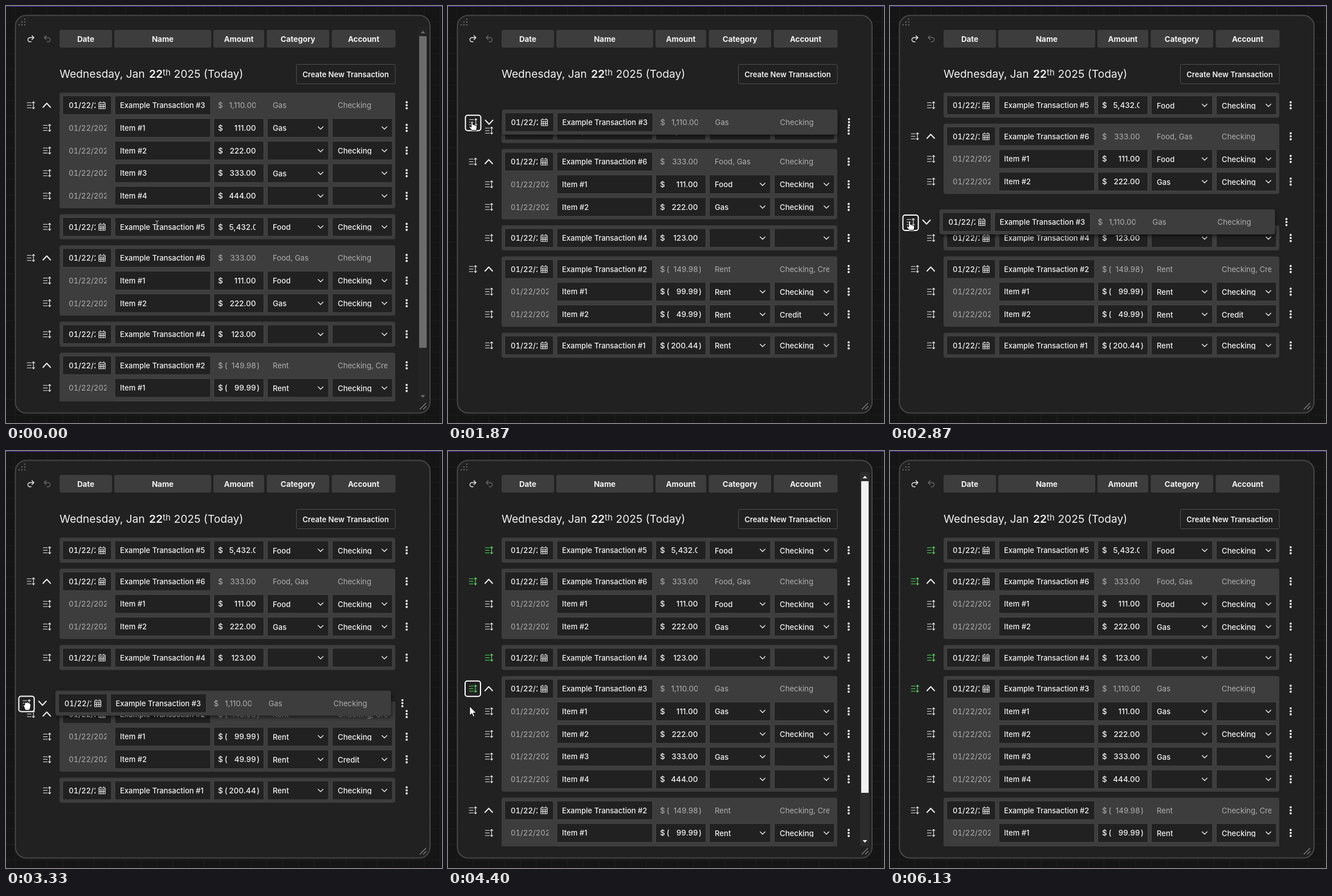
An HTML page for the animation above (6.4 s loop, 765 by 732 pixels).

```html
<!DOCTYPE html>
<html lang="en">
<head>
<meta charset="utf-8">
<title>Transaction list</title>
<style>
  html, body { margin: 0; width: 100%; height: 100%; overflow: hidden; background: #151515; }
  svg { display: block; font: 500 13.2px Inter, sans-serif; font-optical-sizing: none; }
  text { fill: #f2f2f2; white-space: pre; }
  .name { font-size: 13px; }
  .date { font-variant-numeric: tabular-nums; }
  .money { font-size: 13.5px; }
  .dim { fill: #b0b0b0; font-weight: 400; }
  .head { font-size: 13.4px; font-weight: 700; text-anchor: middle; }
  .title { font-size: 19.2px; font-weight: 400; }
  .end { text-anchor: end; }
  .box { fill: #212121; stroke: #4a4a4a; }
  .line { fill: none; stroke: #ececec; stroke-width: 1.4; stroke-linecap: round; stroke-linejoin: round; }
  .thin { stroke-width: 1.15; }
  .bold { stroke-width: 2; }
  .saved .lead { stroke: #5fdc69; }
  .lifted { filter: drop-shadow(1px 3px 3px #0009); }
  .cursor path { fill: #fff; stroke: #000; stroke-linejoin: round; }
</style>
</head>
<body>
<svg id="stage" width="765" height="732" viewBox="0 0 765 732">
  <defs>
    <pattern id="grid" width="27.6" height="27.6" patternUnits="userSpaceOnUse">
      <path d="M0 .5H27.6M16.5 0V27.6" stroke="#1e1e1e"/>
    </pattern>
    <clipPath id="list"><rect y="80" width="765" height="614"/></clipPath>
    <clipPath id="dateBox"><rect x="105" y="-20" width="52" height="40"/></clipPath>
    <clipPath id="dateCell"><rect x="105" y="-20" width="71.5" height="40"/></clipPath>
    <clipPath id="money"><rect x="370" y="-20" width="68" height="40"/></clipPath>
    <clipPath id="cell"><rect x="460" y="-20" width="209" height="40"/></clipPath>
    <clipPath id="select"><rect x="460" y="-20" width="209" height="27"/></clipPath>
    <clipPath id="fold"><rect id="foldRect" y="-20" width="765"/></clipPath>
    <path id="turn" class="line" d="M2 1.5L5.5-2 2-5.5M5.5-2H-1.5A3.6 3.6 0 0 0-1.5 5.2H.5"/>
  </defs>
  <rect width="765" height="732" fill="#151515"/>
  <rect width="765" height="732" fill="url(#grid)"/>
  <rect width="765" height="1" fill="#5533b5"/>
  <rect y="731" width="765" height="1" fill="#1d0f18"/>
  <rect x="16.5" y="16.5" width="727.5" height="698" rx="19" fill="#212121" stroke="#474747" stroke-width="2"/>
  <path d="M33 23h0M28 28h0M33 28h0M23 33h0M28 33h0M33 33h0" stroke="#636363" stroke-width="2.6" stroke-linecap="round"/>
  <path d="M726 708L737 697M732 708L737.5 702.5" stroke="#858585" stroke-width="1.3"/>
  <use href="#turn" x="43.5" y="57.5"/>
  <use href="#turn" transform="translate(72.5 57.5) scale(-1 1)" opacity=".35"/>
  <g id="heads"></g>
  <text class="title" x="94" y="126">Wednesday, Jan</text>
  <text class="title" x="251" y="126" style="font-weight:600">22</text>
  <text class="title" x="275" y="122" style="font-size:15px">th</text>
  <text class="title" x="294.5" y="126">2025 (Today)</text>
  <rect x="509.5" y="102.5" width="173.5" height="34" rx="2" fill="#212121" stroke="#4f4f4f"/>
  <text x="596" y="124.5" text-anchor="middle" style="font-size:13.05px;font-weight:600">Create New Transaction</text>
  <g id="bar" fill="#f1f1f1">
    <rect x="723" y="37" width="16.5" height="657" fill="#2c2c2c"/>
    <rect x="725" y="53" width="13" height="547"/>
    <path d="M727.5 48L731.5 43.5 735.5 48ZM727.5 683L731.5 687.5 735.5 683Z"/>
  </g>
  <g clip-path="url(#list)" id="groups"></g>
  <g class="cursor" id="cursor">
    <path id="arrow" d="M0 0V16.5L3.8 12.8 6.4 18.6 8.9 17.5 6.4 12H11.6Z"/>
    <path id="point" d="M-1.5 1Q0-1 1.5 1V6L7 7.5Q9 8.3 8.5 11L7.5 16H-.5L-5 10.5Q-5.5 8.5-3.5 9L-1.5 10.5Z"/>
    <path id="grab" d="M-5.5 1Q-5-1-3.5 0L-3-4Q-1.5-6 0-4 1.5-6.5 3-4 5-5 5.5-2.5 7.5-3 7 0V3L5 9H-2.5Z"/>
    <path id="beam" d="M-3-8Q0-8 0-6V6Q0 8-3 8M3-8Q0-8 0-6M3 8Q0 8 0 6" style="fill:none;stroke:#c4c4c4"/>
  </g>
</svg>
<script>
const $ = id => document.getElementById(id);
const LOOP = 6400, ROW = 39.75, HEAD = 44, GAP = 10.5, TOP = 152;
const LIFT = 900, DROP = 3530;

// Amounts starting with "-" are shown in parentheses.
const data = [
  { id: 5, amount: '5,432.00', cat: 'Food', acc: 'Checking', swap: 1930 },
  { id: 6, amount: '333.00', cat: 'Food, Gas', acc: 'Checking', swap: 2330,
    items: [['111.00', 'Food', 'Checking'], ['222.00', 'Gas', 'Checking']] },
  { id: 4, amount: '123.00', cat: '', acc: '', swap: 3050 },
  { id: 2, amount: '-149.98', cat: 'Rent', acc: 'Checking, Credit',
    items: [['-99.99', 'Rent', 'Checking'], ['-49.99', 'Rent', 'Credit']] },
  { id: 1, amount: '-200.44', cat: 'Rent', acc: 'Checking' },
  { id: 3, amount: '1,110.00', cat: 'Gas', acc: 'Checking',
    items: [['111.00', 'Gas', ''], ['222.00', '', 'Checking'], ['333.00', 'Gas', ''], ['444.00', '', '']] }
];

const text = (x, s, cls = '', clip = '', y = 4.8) =>
  `<text x="${x}" y="${y}" class="${cls}" ${clip && `clip-path="url(#${clip})"`}>${s}</text>`;
const box = (x, w) => `<rect class="box" x="${x}" y="-16.5" width="${w}" height="33" rx="2"/>`;
const line = (x, d, cls = '') => `<path class="line ${cls}" transform="translate(${x})" d="${d}"/>`;

const handle = (x, cls = '') => line(x,
  'M-6.500-4.500H.5M-6.500 0H.5M-6.500 4.500H.5M4.500-6V6M2.500-4L4.500-6.200 6.500-4M2.500 4L4.500 6.200 6.500 4', 'thin ' + cls);
const kebab = '<path d="M703-5.3h0M703 0h0M703 5.3h0" stroke="#f2f2f2" stroke-width="3.8" stroke-linecap="round"/>';
const calendar = line(168.5,
  'M-5.500-4.500H5.500V6H-5.500ZM-5.500-1.500H5.500M-5.500 2.200H5.500M-2-1.500V6M2-1.500V6M-3-6.500V-4.500M3-6.500V-4.500', 'thin');

function money(s, dim = '') {
  const neg = s[0] === '-', n = neg ? s.slice(1) : s, cls = 'money ' + dim;
  return text(372, '$', cls) + (neg ? text(383.5, '(', cls) + text(440, ')', cls) : '') +
    (n.length > 6 ? text(391.5, n, cls, 'money') : text(438.5, n, cls + ' end'));
}

const select = (x, w, s) => box(x, w) + text(x + 9.5, s, '', 'select', 5.4) +
  line(x + w - 14, 'M-4.300-2L0 2.300 4.300-2');

const inputs = (amount, cat, acc) =>
  box(364.5, 88) + money(amount) + select(458.5, 107.5, cat) + select(572.5, 105.5, acc);

const row = (i, body) => `<g transform="translate(0 ${22.2 + i * ROW})">${body}${kebab}</g>`;

function groupBody({ id, amount, cat, acc, items }) {
  const lead = id > 2 ? 'lead' : '';
  let head = box(99.5, 85.5) + text(110, '01/22/2025', 'date', 'dateBox') + calendar +
    box(191, 168) + text(200, 'Example Transaction #' + id, 'name');
  head += items
    ? handle(43.7, lead) + `<path id="chev${id}" class="line bold" d="M65 3.5L71.500-3.500 78 3.500"/>` +
      money(amount, 'dim') + text(468, cat, 'dim') + text(582, acc, 'dim', 'cell')
    : handle(72, lead) + inputs(amount, cat, acc);
  return row(0, head) + (items || []).map((item, i) => row(i + 1,
    handle(72) + text(110, '01/22/2025', 'date dim', 'dateCell') +
    box(191, 168) + text(200, 'Item #' + (i + 1), 'name') + inputs(...item))).join('');
}

$('heads').innerHTML = [['Date', 94, 92], ['Name', 190, 170], ['Amount', 364, 89], ['Category', 457.5, 109.5], ['Account', 571.5, 112]]
  .map(([s, x, w]) => `<rect x="${x}" y="42" width="${w}" height="31" rx="3" fill="#3d3d3d"/>` +
    text(x + w / 2, s, 'head', '', 63)).join('');

let base = TOP;
$('groups').innerHTML = data.map(g => {
  g.h = HEAD + (g.items || []).length * ROW;
  g.base = base;
  base += g.h + GAP;
  const moving = g.id === 3;
  return `<g id="group${g.id}"><rect id="back${g.id}" x="94" width="589" height="${g.h}" rx="4" fill="#3d3d3d"/>
    <g ${moving ? 'clip-path="url(#fold)"' : ''}>${groupBody(g)}</g>
    ${moving ? '<rect id="ring" x="30" width="27" height="27" rx="4" fill="none" stroke="#fff" stroke-width="2"/>' : ''}</g>`;
}).join('');

const full = data[5].h, landed = data[3].base - TOP;
const part = (t, a, b) => Math.min(1, Math.max(0, (t - a) / (b - a)));
const smooth = x => x * x * (3 - 2 * x);
const out = x => 1 - (1 - x) ** 2;
const show = (el, on) => el.setAttribute('visibility', on ? 'visible' : 'hidden');
const move = (el, x, y) => el.setAttribute('transform', `translate(${x} ${y})`);

function along(t, keys) {
  let i = 1;
  while (i < keys.length - 1 && t > keys[i][0]) i++;
  const [a, u] = keys[i - 1], [b, v] = keys[i];
  return u + (v - u) * part(t, a, b);
}

const dragX = [[870, 0], [1000, 1.6], [1670, 1.6], [1870, .6], [2200, -7], [2470, -7.3], [3330, -7.5], [3530, -7.5], [3700, 0]];
const dragY = [[870, 0], [1000, -2], [1670, -2], [1870, 29.5], [2070, 80], [2330, 140], [2470, 185],
  [2930, 208], [3330, 268.5], [3530, 268.5], [3700, landed]];
const glow = [[70, .36], [330, 1], [4870, 1], [5270, 0]];

function drawCursor(t) {
  let kind, x, y;
  if (t < LIFT) {
    const p = smooth(part(t, 40, 670));
    x = 265 - 220 * p;
    y = 385 - 209 * p;
    kind = t >= 730 ? 'grab' : x < 58 ? 'point' : x > 190 ? 'beam' : 'arrow';
    if (kind === 'point') y -= 5;
  } else if (t < 3700) {
    const held = Math.min(t, DROP);
    x = 43.7 + along(held, dragX);
    y = 177.5 + along(held, dragY);
    kind = t > 1670 && t < 3200 ? 'point' : 'grab';
    if (kind === 'point') { x -= 2; y -= 5; }
  } else {
    const p = part(t, 4400, 4930);
    x = 38 - 5 * p;
    y = 448 + 290 * p * p;
    kind = 'arrow';
  }
  for (const k of ['arrow', 'point', 'grab', 'beam']) show($(k), k === kind);
  move($('cursor'), x, y);
}

function draw(t) {
  const open = t < DROP ? 1 - smooth(part(t, 930, 1230)) : smooth(part(t, 3700, 4020));
  const height = HEAD + (full - HEAD) * open;
  const slot = HEAD + .5;
  const pitch = t < LIFT ? full + GAP : t < DROP ? slot : slot + (full + GAP - slot) * open;
  for (const g of data.slice(0, 5)) {
    const up = g.swap ? out(part(t, g.swap, g.swap + 235)) : 0;
    move($('group' + g.id), 0, g.base + pitch * (1 - up));
  }

  const lifted = t >= LIFT && t < 3720;
  move($('group3'), along(t, dragX), TOP + along(t, dragY));
  $('back3').setAttribute('height', height);
  $('back3').classList.toggle('lifted', lifted);
  $('foldRect').setAttribute('height', height + 20);
  $('chev3').setAttribute('transform', `rotate(${180 * (1 - open)} 71.5 0)`);
  $('ring').setAttribute('y', lifted ? 10 : 8.7);
  show($('ring'), t >= LIFT && t < 5870);

  $('stage').classList.toggle('saved', t >= 3800);
  show($('bar'), t < LIFT || t > 3850);
  $('bar').setAttribute('opacity', along(t, glow));
  drawCursor(t);
}

const start = performance.now();
function tick() {
  draw((performance.now() - start) % LOOP);
  requestAnimationFrame(tick);
}
tick();
</script>
</body>
</html>
```
